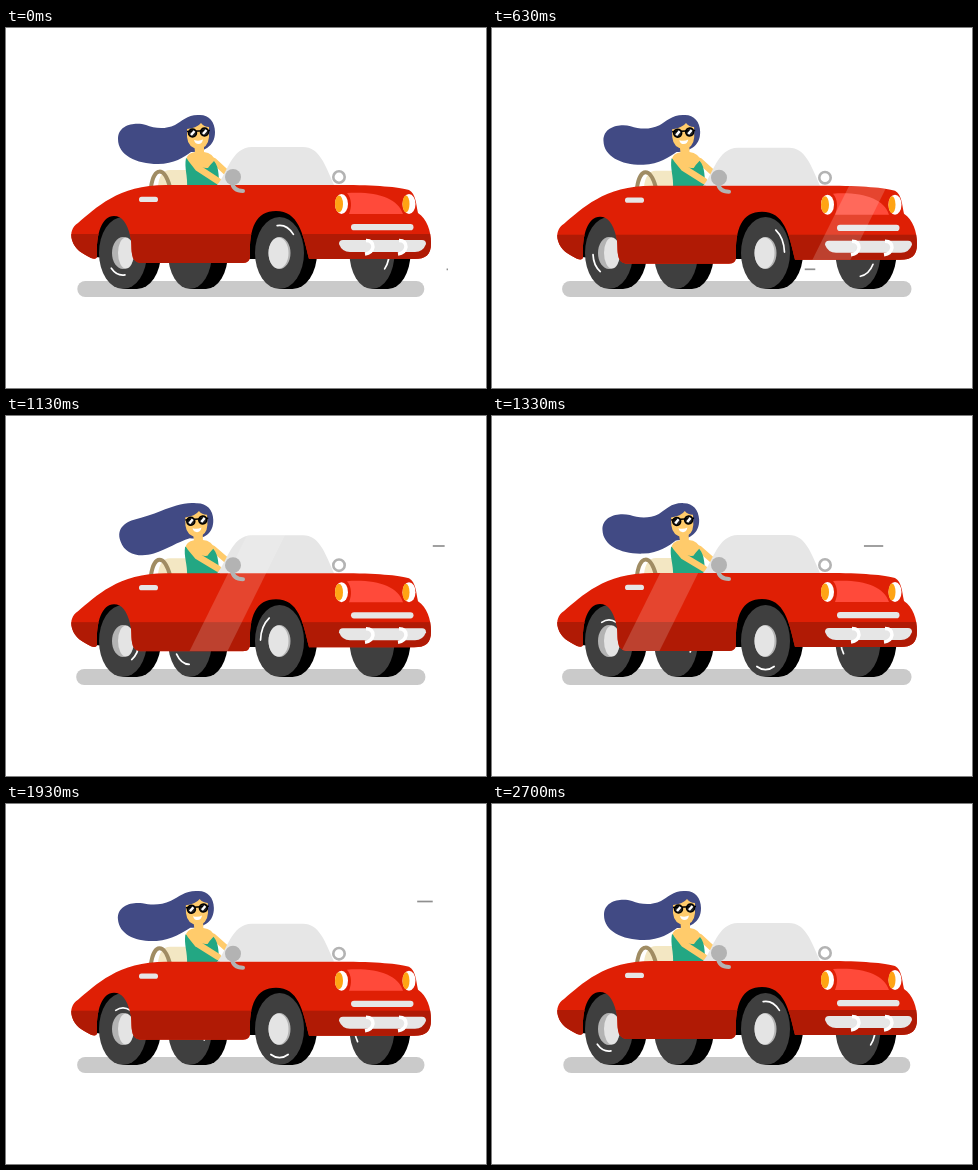
These frames come from a looping animation (480 by 360 pixels, 2730 ms). An HTML page:

```html
<!DOCTYPE html>
<html lang="en">
<head>
<meta charset="utf-8">
<title>Red convertible</title>
<style>
html, body { margin: 0; width: 100%; height: 100%; overflow: hidden; background: #fff; }
svg { display: block; width: 100vw; height: 100vh; }
</style>
</head>
<body>
<svg viewBox="0 0 480 360">
  <defs>
    <path id="body" d="M66 212C64 205 66 199 72 195C90 180 112 157 160 157L335 157C370 157 393 159 403 162C410 166 410 176 412 185C421 191 425 203 425 215C425 227 420 231 408 231L303 231C297 205 292 183 270 183C250 183 243 200 244 228Q244 235 237 235L134 235Q127 234 126 226C125 219 126 213 124 207C121 195 116 188 108 188C96 188 90 205 91 229Q90 232 85 230C76 225 69 222 66 212Z"/>
    <path id="glass" d="M211 157C221 147 225 119 246 119L297 119C313 119 319 136 328 157Z"/>
    <clipPath id="bodyClip"><use href="#body"/></clipPath>
    <clipPath id="carClip"><use href="#body"/><use href="#glass"/></clipPath>
  </defs>

  <rect id="shadow" y="253" height="16" rx="8" fill="#cacaca"/>
  <g id="lines" stroke="#8f8f8f" stroke-width="1.7"></g>

  <g id="seat">
    <path d="M152 158C153 148 157 142 164 142L184 142L184 158Z" fill="#f3e7c3"/>
    <path d="M145 159C148 139 158 138 164 159" fill="none" stroke="#a08c63" stroke-width="4"/>
  </g>

  <g id="woman">
    <path id="hair" fill="#414a84"/>
    <path d="M208 133L221 145" stroke="#ffcb6b" stroke-width="6" stroke-linecap="round"/>
    <path d="M188 115H198V124Q207 125 210 134L206 142H184L180 132Q181 125 189 124Z" fill="#ffcb6b"/>
    <path d="M180 130C178 140 182 148 181 160L214 160C212 150 214 140 208 133Q204 137 202 140Q192 141 180 130Z" fill="#23a783"/>
    <path d="M185 131L192 140L212 153" fill="none" stroke="#ffcb6b" stroke-width="6.5" stroke-linecap="round" stroke-linejoin="round"/>
    <path d="M181 101Q191 100 195 95Q198 99 203 99V109Q202 120 192.500 121Q182 120 181 109Z" fill="#ffcb6b"/>
    <g fill="#222" stroke="#000" stroke-width="1.500">
      <circle cx="186.500" cy="105" r="4"/>
      <circle cx="198.500" cy="104" r="4"/>
      <path d="M181 103.500L204 102.500" fill="none"/>
    </g>
    <path d="M185 107L188.500 103M197 106L200.500 102" stroke="#fff" stroke-width="2.500"/>
    <path d="M188 112Q193 113.500 197 111.500Q196 116 192.500 116Q189 116 188 112Z" fill="#fff"/>
  </g>

  <path d="M88 229C88 200 94 184 108 184C123 184 130 207 132 232ZM241 231C240 200 252 179 270 179C295 179 302 208 306 231Z"/>
  <g id="wheels"></g>

  <g id="car">
    <circle cx="333" cy="149" r="5.700" fill="#fff" stroke="#b3b3b3" stroke-width="2.600"/>
    <use href="#glass" fill="#e6e6e6"/>
    <use href="#body" fill="#df1f05"/>
    <rect x="60" y="206" width="370" height="32" fill="#b01a05" clip-path="url(#bodyClip)"/>
    <path d="M341 165C370 163 392 170 397 186L343 186C346 179 346 171 341 165Z" fill="#ff4a3a"/>
    <g fill="#fff">
      <ellipse cx="335.500" cy="176" rx="6.500" ry="10"/>
      <ellipse cx="403" cy="176" rx="6.500" ry="10"/>
    </g>
    <g fill="#ffa414">
      <ellipse cx="333" cy="176" rx="4" ry="8.500"/>
      <ellipse cx="400" cy="176" rx="3.500" ry="8.500"/>
    </g>
    <rect x="345" y="196" width="62.500" height="6.300" rx="3.100" fill="#e6e6e6"/>
    <path d="M337 212H416Q420 212 420 216Q417 224 409 224H344Q336 224 333 216Q333 212 337 212Z" fill="#e6e6e6"/>
    <path d="M360 212.500q7 0 7 6.500q-1 6 -8 7M393 212.500q7 0 7 6.500q-1 6 -8 7" fill="none" stroke="#fff" stroke-width="3.500"/>
    <rect x="133" y="168.800" width="19" height="5.300" rx="2.600" fill="#e6e6e6"/>
    <path id="gleam" fill="#fff" fill-opacity=".17" clip-path="url(#carClip)"/>
    <path d="M226 154Q227 163 237 163" fill="none" stroke="#b3b3b3" stroke-width="4" stroke-linecap="round"/>
    <circle cx="227" cy="149" r="8" fill="#b3b3b3"/>
  </g>
</svg>
<script>
const LOOP = 2730, CYCLE = 2700, FRAME = 100 / 3;
const $ = id => document.getElementById(id);

function add(parent, tag, attrs) {
  const el = document.createElementNS("http://www.w3.org/2000/svg", tag);
  set(el, attrs);
  parent.appendChild(el);
  return el;
}
function set(el, attrs) {
  for (const key in attrs) el.setAttribute(key, attrs[key]);
}

// Tyre centre and radius, tread depth, hub shift, highlight radii and angle
const wheels = [
  { x: 184, r: 22, tread: 16, rx: 16, ry: 23, turn: -90 },
  { x: 366, r: 22.5, tread: 16, rx: 17, ry: 23, turn: 85 },
  { x: 117, r: 24, tread: 14, hub: 3, rx: 16, ry: 21.5, turn: 180 },
  { x: 273.5, r: 24.5, tread: 13, hub: -1, rx: 19, ry: 28, turn: 0 }
];
for (const w of wheels) {
  const g = $("wheels");
  add(g, "path", { d: `M${w.x} 189H${w.x + w.tread}A${w.r} 36 0 0 1 ${w.x + w.tread} 261H${w.x}Z` });
  add(g, "ellipse", { cx: w.x, cy: 225, rx: w.r, ry: 36, fill: "#3f3f3f" });
  if (w.hub) {
    add(g, "ellipse", { cx: w.x, cy: 225, rx: 11, ry: 16, fill: "#b3b3b3" });
    add(g, "ellipse", { cx: w.x + w.hub, cy: 225, rx: 11 - Math.abs(w.hub), ry: 15.5, fill: "#e4e4e4" });
  }
  w.arc = add(g, "path", { fill: "none", stroke: "#fff", "stroke-width": 1.7, "stroke-linecap": "round" });
}

const streaks = [
  { start: 0, x: 442, y: 241.3, length: 144, time: 900 },
  { start: 900, x: 458, y: 130, length: 144, time: 900 },
  { start: 1800, x: 442, y: 97.5, length: 275, time: 800 }
];
for (const s of streaks) s.el = add($("lines"), "path", {});

const wavy = [194,87, 182,86, 176,93, 169,97, 158,102, 148,100, 140,97, 130,94, 112,96, 112,111, 112,127, 130,136, 152,136, 168,136, 178,129, 185,124];
const swept = [192,87, 180,85, 166,88, 153,92, 144,95, 135,99, 127,103, 118,107, 111,115, 117,127, 123,140, 136,141, 147,136, 160,130, 170,124, 185,121];

const mix = (a, b, k) => a + (b - a) * k;
const swing = (t, n) => (1 - Math.cos(2 * Math.PI * n * t / CYCLE)) / 2;
const ease = p => p < 0.5 ? 2 * p * p : 1 - 2 * (1 - p) * (1 - p);

function arcPath(w, angle) {
  const at = deg => {
    const a = deg * Math.PI / 180;
    return `${w.x + w.rx * Math.cos(a)} ${225.5 + w.ry * Math.sin(a)}`;
  };
  return `M${at(angle - 27)}A${w.rx} ${w.ry} 0 0 1 ${at(angle + 27)}`;
}

function hairPath(k) {
  const p = wavy.map((v, i) => mix(v, swept[i], k));
  return `M${p[0]} ${p[1]}C${p.slice(2).join(" ")}C197 124 209 119 209 104C209 94 203 87 ${p[0]} ${p[1]}Z`;
}

function draw(t) {
  const bob = { transform: `translate(0 ${0.7 * swing(t, 2)})` };
  set($("car"), bob);
  set($("seat"), bob);
  set($("woman"), { transform: `rotate(${-2 * swing(t, 1)} 197 157)` });
  set($("hair"), { d: hairPath(swing(t, 4)) });

  const grow = 1.3 * swing(t, 11);
  set($("shadow"), { x: 71.3 - grow, width: 347 + 2 * grow });

  const spin = -70 + 360 * t / 300;
  for (const w of wheels) set(w.arc, { d: arcPath(w, spin + w.turn) });

  // Slanted shine sweeping from bonnet to tail
  const x = 528 - 0.27 * t;
  set($("gleam"), { d: `M${x + 21} 115h38l-62 125h-38Z` });

  for (const s of streaks) {
    const p = (t - s.start) / s.time;
    const on = p >= 0 && p < 1;
    const tail = s.x - s.length * ease(p);
    const head = s.x - s.length * ease(Math.min(1, p + 0.07));
    set(s.el, { d: on ? `M${head} ${s.y}H${tail}` : "" });
  }
}

const began = performance.now();
function tick(now) {
  const t = Math.max(0, now - began) % LOOP;
  draw(Math.min(CYCLE, Math.floor((t + 4) / FRAME) * FRAME));
  requestAnimationFrame(tick);
}
draw(0);
requestAnimationFrame(tick);
</script>
</body>
</html>
```
